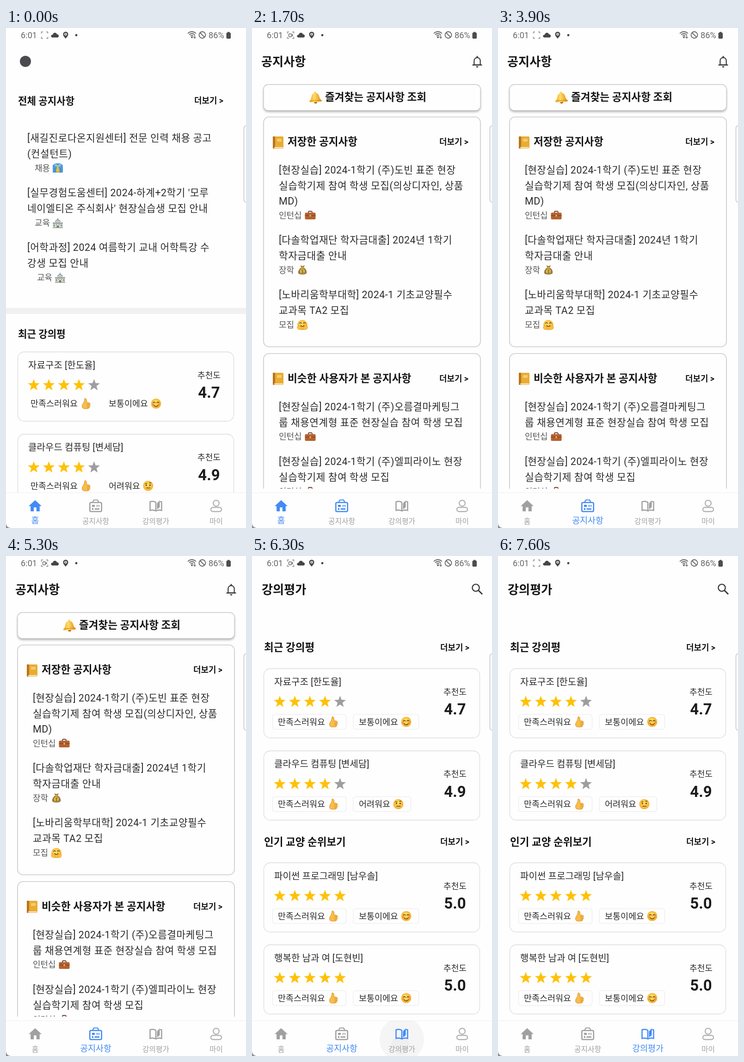
Animation of 519 by 1079 pixels, one loop 8000 ms. Source, as an HTML page with a canvas:

```html
<!DOCTYPE html>
<html lang="ko">
<head>
<meta charset="utf-8">
<title>공지사항</title>
<style>
html, body { margin: 0; width: 100%; height: 100%; overflow: hidden; background: #fefefe; }
canvas { display: block; width: 100vw; height: 100vh; }
</style>
</head>
<body>
<canvas id="stage"></canvas>
<script>
const W = 519, H = 1079, LOOP = 8000;
const cv = document.getElementById('stage'), c = cv.getContext('2d');
const dpr = window.devicePixelRatio || 1;
cv.width = W * dpr;
cv.height = H * dpr;

const FONT = "Roboto, 'Noto Sans CJK KR', 'Noto Sans CJK', sans-serif";
const BLUE = [66, 138, 246], GREY = [160, 160, 161], INK = '#2b2b2b', GOLD = '#ffc107';
const NAV_TOP = 1003;
const blinks = [700, 1200, 1600, 2100, 2500, 3000, 3400, 3900, 4400, 4800, 5300, 5800, 6300, 6700, 7200, 7600];

const clamp = v => Math.max(0, Math.min(1, v));
const ease = v => v * v * (3 - 2 * v);
const mix = (a, b, p) => a + (b - a) * p;
const tint = p => `rgb(${GREY.map((g, i) => Math.round(mix(g, BLUE[i], p)))})`;

// y is the visual middle of the line
function text(s, x, y, size, o = {}) {
  c.font = `${o.bold ? 700 : 400} ${size}px ${FONT}`;
  c.letterSpacing = (o.gap || 0) + 'px';
  c.textAlign = o.align || 'left';
  c.fillStyle = o.color || INK;
  c.fillText(s, x, y + size * 0.37);
}
const bold = (s, x, y, size) => text(s, x, y, size, { bold: true, color: '#161616' });
const body = (s, x, y) => text(s, x, y, 21.4, { gap: 0.5 });
const tag = (s, x, y) => text(s, x, y, 18, { color: '#555' });
const more = (x, y) => bold('더보기 >', x, y, 17.9);

function box(x, y, w, h, r, fill, stroke, lw = 1.3) {
  c.beginPath();
  c.roundRect(x, y, w, h, r);
  paint(fill, stroke, lw);
}
function paint(fill, stroke, lw = 1.5) {
  if (fill) { c.fillStyle = fill; c.fill(); }
  if (stroke) { c.strokeStyle = stroke; c.lineWidth = lw; c.stroke(); }
}
function disc(x, y, r, fill, stroke, lw) {
  c.beginPath();
  c.arc(x, y, r, 0, 7);
  paint(fill, stroke, lw);
}
function arc(x, y, r, a, b, color, lw) {
  c.beginPath();
  c.arc(x, y, r, a, b);
  paint(null, color, lw);
}
function path(d, fill, stroke, lw) {
  const p = new Path2D(d);
  if (fill) { c.fillStyle = fill; c.fill(p); }
  if (stroke) { c.strokeStyle = stroke; c.lineWidth = lw; c.stroke(p); }
}
function at(x, y, draw, k = 1) {
  c.save();
  c.translate(x, y);
  c.scale(k, k);
  draw();
  c.restore();
}
function clipTo(bottom, draw) {
  c.save();
  c.beginPath();
  c.rect(0, 0, W, bottom);
  c.clip();
  draw();
  c.restore();
}

function face() {
  const g = c.createRadialGradient(-2, -4, 1, 0, 0, 11);
  g.addColorStop(0, '#ffe567');
  g.addColorStop(1, '#f5ae2e');
  disc(0, 0, 10.8, g);
}
const emoji = {
  shirt() {
    path('M-5-10H5L11-6V10H-11V-6Z', '#4f9bdc');
    path('M-6 0V10M6 0V10', null, '#3477b4', 1);
    path('M-5-10L0-5L5-10L7-5L2-2L0-5L-2-2L-7-5Z', '#8cc3ee');
    path('M-2-5H2L1.5-2L4 7L0 10L-4 7L-1.5-2Z', '#e9c02f');
  },
  school() {
    path('M-10.500 0H10.500V10H-10.500Z', '#d6d0c2');
    path('M-5-4L0-8L5-4V10H-5Z', '#ebe5d6');
    path('M-11 0H11', null, '#8a97a0', 2.4);
    path('M-6-3L0-8L6-3', null, '#8a97a0', 2);
    path('M0-8V-11', null, '#7d8a94', 1.3);
    disc(0, -2, 1.8, '#fff', '#8b867c', 1);
    path('M-9.500 3H-6.500V7H-9.500ZM6.500 3H9.500V7H6.500ZM-4 2H-1.500V4.500H-4ZM1.500 2H4V4.500H1.500Z', '#6fa3bd');
    path('M-2.500 5.500H2.500V10H-2.500Z', '#8a6b50');
    path('M-11 10H11', null, '#8d9a80', 1.5);
  },
  thumb() {
    path('M-3-11C1-12 2-8 1-3L6-2C10-1 9 2 8 3C10 5 8 7 7 7C8 9 6 11 3 11H-3C-8 11-9 7-8 3C-7 0-3-3-3-11Z', '#f9bd47', '#d98d2b', 1);
    path('M2 1H8M2 4.500H7.500M2 7.800H6.500', null, '#cf8428', 1.1);
  },
  smile() {
    face();
    disc(-6.5, 2, 2.2, 'rgba(244,105,60,.55)');
    disc(6.5, 2, 2.2, 'rgba(244,105,60,.55)');
    arc(-4, -1, 2.2, Math.PI, 0, '#6b421b', 1.6);
    arc(4, -1, 2.2, Math.PI, 0, '#6b421b', 1.6);
    arc(0, 1.5, 4.8, 0.3, Math.PI - 0.3, '#6b421b', 1.5);
  },
  doubt() {
    face();
    disc(-4, -1.5, 1.6, '#5f3b18');
    disc(4, -1.5, 1.6, '#5f3b18');
    path('M-6.500-5H-2M2-6L6.500-6.500M-4 4.500H4.500', null, '#6b421b', 1.5);
  },
  hug() {
    face();
    arc(-4, -3, 2, Math.PI, 0, '#6b421b', 1.5);
    arc(4, -3, 2, Math.PI, 0, '#6b421b', 1.5);
    arc(0, -0.5, 3.8, 0.2, Math.PI - 0.2, '#74401c', 1.6);
    for (const s of [-1, 1]) {
      c.beginPath();
      c.ellipse(s * 6.8, 6, 4.6, 3.6, s * -0.6, 0, 7);
      paint('#fdc243', '#e09a30', 1);
    }
  },
  case() {
    box(-4, -8.5, 8, 5, 2, null, '#6d3a22', 1.8);
    box(-11.5, -5.5, 23, 14.5, 2, '#b5602f');
    c.fillStyle = '#8a4424';
    c.fillRect(-11.5, 0, 23, 1.6);
    c.fillStyle = '#e7b84e';
    c.fillRect(-1.5, -1, 3, 4);
  },
  money() {
    path('M-4-10L0-8L5-10L3-5C8-2 10 3 9 7C8 11-8 11-9 7C-10 3-7-2-3-5Z', '#9a7d42');
    path('M-4-4.500H4', null, '#e3c14c', 2);
    disc(0, 3, 5, '#e9c650');
    text('$', 0, 3.2, 9, { bold: true, align: 'center', color: '#6a5220' });
  },
  bell() {
    c.rotate(-0.06);
    c.scale(1.14, 1.06);
    disc(0, 9.5, 3, '#b9781c');
    const g = c.createLinearGradient(-9, 0, 9, 0);
    g.addColorStop(0, '#f7b52e');
    g.addColorStop(0.4, '#ffdc6a');
    g.addColorStop(1, '#e79a1f');
    path('M0-12C2-12 2-10 2-9C8-8 7 2 10 5C14 7 12 9 9 9H-9C-12 9-14 7-10 5C-7 2-8-8-2-9C-2-10-2-12 0-12Z', g);
    path('M-10 6H10', null, '#d08a1c', 1.2);
  },
  book() {
    box(-11, -13, 23, 26, 2, '#e9ac31');
    c.fillStyle = '#b8741c';
    c.fillRect(-11, -13, 5, 26);
    c.fillStyle = '#f7ecd2';
    c.fillRect(-8, 10, 19, 2);
    box(-2, -8, 10, 6, 1, '#f4cd70');
  }
};
const put = (name, x, y) => at(x, y, emoji[name]);

function star(x, y, fill) {
  c.beginPath();
  for (let i = 0; i < 10; i++) {
    const r = i % 2 ? 5.6 : 13.4, a = i * Math.PI / 5 - Math.PI / 2;
    c.lineTo(x + r * Math.cos(a), y + 0.8 + r * Math.sin(a));
  }
  c.closePath();
  paint(fill);
}

function review(top, title, stars, score, mood, chips) {
  box(25.5, top, 467, 149.5, 14, '#fefefe', '#dcdcde');
  text(title, 48, top + 28.5, 20.1);
  for (let i = 0; i < 5; i++) star(60 + i * 32.6, top + 71, i < stars ? GOLD : '#9e9ea2');
  text('추천도', 439, top + 50, 18.2, { align: 'center' });
  text(score, 439, top + 87, 33, { bold: true, align: 'center', color: '#1c1c1c' });
  const [word, pic] = mood;
  const y = top + (chips ? 115 : 111.5), x1 = chips ? 56 : 53, x2 = chips ? 231 : 222;
  const w2 = word.length * 17.1;
  if (chips) {
    box(44.5, y - 16, 159, 32, 5, null, '#e9e9eb', 1.1);
    box(219, y - 16, w2 + 56, 32, 5, null, '#e9e9eb', 1.1);
  }
  text('만족스러워요', x1, y, 18.5);
  put('thumb', x1 + 120, y);
  text(word, x2, y, 18.5);
  put(pic, x2 + w2 + 17, y);
}
const OK = ['보통이에요', 'smile'], HARD = ['어려워요', 'doubt'];
const DATA = '자료구조 [한도율]', CLOUD = '클라우드 컴퓨팅 [변세담]';

function homePage() {
  disc(42, 72, 12, '#4b4b4f');
  bold('전체 공지사항', 26, 157, 21.2);
  more(407, 156);
  body('[새길진로다온지원센터] 전문 인력 채용 공고', 46, 237);
  body('(컨설턴트)', 46, 271);
  tag('채용', 62, 302);
  put('shirt', 112, 302);
  body("[실무경험도움센터] 2024-하계+2학기 '모루", 46, 355);
  body("네이엘티온 주식회사' 현장실습생 모집 안내", 46, 389);
  tag('교육', 62, 420);
  put('school', 112, 421);
  body('[어학과정] 2024 여름학기 교내 어학특강 수', 46, 473);
  body('강생 모집 안내', 46, 507);
  tag('교육', 67, 538);
  put('school', 117, 539);
  c.fillStyle = '#f1f1f2';
  c.fillRect(0, 604, W, 13);
  bold('최근 강의평', 26, 660, 21.2);
  review(699, DATA, 4, '4.7', OK);
  review(876.5, CLOUD, 4, '4.9', HARD);
}

function bellIcon() {
  path('M-9 8H9M-7 8V-1C-7-11 7-11 7-1V8', null, '#3a3a3c', 2.3);
  path('M-11 7H11V9.500H-11ZM-3 11H3Q2 14 0 14Q-2 14-3 11ZM-1.500-12H1.500V-8H-1.500Z', '#3a3a3c');
}

function noticePage() {
  bold('공지사항', 20, 72, 26.2);
  at(487, 72, bellIcon, 0.95);
  c.save();
  c.shadowColor = 'rgba(0,0,0,.32)';
  c.shadowBlur = 5 * dpr;
  c.shadowOffsetY = 3 * dpr;
  box(25, 122, 469, 56, 10, '#fefefe');
  c.restore();
  box(25, 122, 469, 56, 10, null, '#c9c9c9');
  put('bell', 137, 150);
  bold('즐겨찾는 공지사항 조회', 158, 149, 22.6);
  clipTo(994, () => {
    box(25, 192, 469, 496, 12, '#fefefe', '#c9c9cb', 1.6);
    put('book', 56, 247);
    bold('저장한 공지사항', 77, 245, 22.6);
    more(405, 245);
    body('[현장실습] 2024-1학기 (주)도빈 표준 현장', 58, 306);
    body('실습학기제 참여 학생 모집(의상디자인, 상품', 58, 340);
    body('MD)', 58, 373);
    tag('인턴십', 58, 404);
    put('case', 126, 404);
    body('[다솔학업재단 학자금대출] 2024년 1학기', 58, 457);
    body('학자금대출 안내', 58, 491);
    tag('장학', 58, 522);
    put('money', 109, 522);
    body('[노바리움학부대학] 2024-1 기초교양필수', 58, 575);
    body('교과목 TA2 모집', 58, 609);
    tag('모집', 58, 640);
    put('hug', 109, 641);
    box(25, 702.5, 469, 400, 12, '#fefefe', '#c9c9cb', 1.6);
    put('book', 56, 757);
    bold('비슷한 사용자가 본 공지사항', 77, 756, 22.7);
    more(405, 756);
    body('[현장실습] 2024-1학기 (주)오름결마케팅그', 58, 817);
    body('룹 채용연계형 표준 현장실습 참여 학생 모집', 58, 851);
    tag('인턴십', 58, 881);
    put('case', 126, 882);
    body('[현장실습] 2024-1학기 (주)엘피라이노 현장', 58, 935);
    body('실습학기제 참여 학생 모집', 58, 969);
    tag('인턴십', 58, 1000);
    put('case', 126, 1000);
  });
}

function reviewPage() {
  bold('강의평가', 21, 72, 26.2);
  disc(484, 68.5, 7.6, null, '#3a3a3c', 2.4);
  path('M489.500 74L498 82.500', null, '#3a3a3c', 3);
  bold('최근 강의평', 26, 197, 22.5);
  more(407, 197);
  review(243, DATA, 4, '4.7', OK, true);
  review(420.5, CLOUD, 4, '4.9', HARD, true);
  bold('인기 교양 순위보기', 26, 617, 22.5);
  more(407, 616);
  review(662, '파이썬 프로그래밍 [남우솔]', 5, '5.0', OK, true);
  review(839, '행복한 남과 여 [도현빈]', 5, '5.0', OK, true);
}

function statusBar(on) {
  const col = '#666668';
  text('6:01', 32, 15, 18.2, { color: col });
  path('M76.500 12V8.500H80M87 8.500H90.500V12M90.500 19V22.500H87M80 22.500H76.500V19', null, '#858588', 1.3);
  if (on) {
    box(79.5, 12.5, 6, 6.5, 1.5, null, col, 1.4);
    path('M85.500 15.500L88.500 13V18.500Z', col);
  }
  path('M101 20.500C96 20.500 96 14.500 101 14.500C102 9 109 9 110 13.500C115 13.500 115.500 20.500 111 20.500Z', '#454547');
  path('M129 23C126 19 123.500 17 123.500 13.500A5.500 5.500 0 0 1 134.500 13.500C134.500 17 132 19 129 23Z', '#454547');
  disc(129, 13.5, 2.8, '#fefefe');
  disc(129, 13.5, 1.2, '#454547');
  disc(152, 15.5, 2.4, '#454547');
  for (const r of [4, 8, 12]) arc(402, 20, r, -2.4, -0.75, col, 1.8);
  disc(402, 20, 2, col);
  path('M408 14V22M405.500 19.500L408 22L410.500 19.500', null, col, 1.3);
  disc(424.5, 15, 7, null, col, 1.8);
  path('M419.500 10L429.500 20', null, col, 1.8);
  text('86%', 438, 15, 18.2, { color: col });
  box(476.5, 10, 9.5, 13, 2, '#4c4c4e');
  c.fillRect(479, 8.5, 4.5, 2);
}

const icons = [
  col => { c.translate(-16.8, -16.3); c.scale(1.4, 1.42); path('M10 20v-6h4v6h5v-8h3L12 3 2 12h3v8z', col); },
  col => {
    box(-12.7, -7, 25.4, 19.5, 2.5, null, col, 2.6);
    path('M-7-7L-4-12.500H4L7-7', null, col, 2.2);
    box(-8, -2, 6, 4.5, 0.5, col);
    c.fillRect(2, -2, 2, 4.5);
    c.fillRect(6, -2, 2, 4.5);
    c.fillRect(-8, 5, 3, 4);
    c.fillRect(-2.5, 5.5, 10.5, 3);
  },
  col => {
    path('M0-7.500Q-6-11-12.500-8.500V10Q-6 8 0 11Z', null, col, 2.5);
    path('M9-9L12.500-8.500V10Q6 8 0 11', null, col, 2.5);
    path('M2.500-5L8.500-12V3L2.500 8Z', col);
  },
  col => {
    c.globalAlpha = 0.8;
    disc(0, -5.5, 6.4, null, col, 2.4);
    box(-11.5, 3.5, 23, 9, 4.5, null, col, 2.4);
  }
];
const labels = ['홈', '공지사항', '강의평가', '마이'];
const tabX = [63, 194, 324, 454.5];

// touch highlight with a spreading splash
function ripple(t, x, down, up, end) {
  if (t < down || t >= end) return;
  const a = 0.034 * clamp((t - down) / 100) * (1 - clamp((t - up) / (end - up)));
  disc(x, 1043, 48, `rgba(0,0,0,${a})`);
  const s = clamp((t - up + 60) / 260);
  if (s > 0) disc(mix(x - 4, x, s), mix(1060, 1043, s), mix(12, 48, s), `rgba(0,0,0,${a * 0.7})`);
}

function navBar(t, prev, now, p) {
  c.fillStyle = '#fefefe';
  c.fillRect(0, NAV_TOP, W, H - NAV_TOP);
  c.fillStyle = '#f0f0f1';
  c.fillRect(0, NAV_TOP - 0.5, W, 1);
  c.save();
  c.beginPath();
  c.rect(0, NAV_TOP, W, H - NAV_TOP);
  c.clip();
  ripple(t, tabX[1], 1700, 1800, 2100);
  ripple(t, tabX[2], 6050, 6300, 6700);
  c.restore();
  tabX.forEach((x, i) => {
    const k = i === now ? p : i === prev ? 1 - p : 0;
    const lit = i === 0 ? k : +(i === now);
    at(x, 1031, () => icons[i](tint(lit)));
    text(labels[i], x, mix(1064, 1062, k), mix(15.8, 18.4, k), { align: 'center', color: tint(k) });
  });
}

function draw(t) {
  const now = t < 1700 ? 0 : t < 6300 ? 1 : 2;
  const since = [-1000, 1700, 6300][now];
  c.setTransform(dpr, 0, 0, dpr, 0, 0);
  c.fillStyle = '#fefefe';
  c.fillRect(0, 0, W, H);
  [homePage, noticePage, reviewPage][now]();
  statusBar(blinks.filter(b => b <= t).length % 2 === 1);
  box(514.5, 211, 14, 165, 5, '#fefefe', '#c4c4c6', 1.5);
  navBar(t, now - 1, now, ease(clamp((t - since) / 200)));
  path('M0 1069Q1 1078 10 1079H0Z', '#8d8d8f');
}

function tick() {
  const t = performance.now() % LOOP;
  draw(Math.floor(t / 100) * 100);
  requestAnimationFrame(tick);
}
tick();
</script>
</body>
</html>
```
